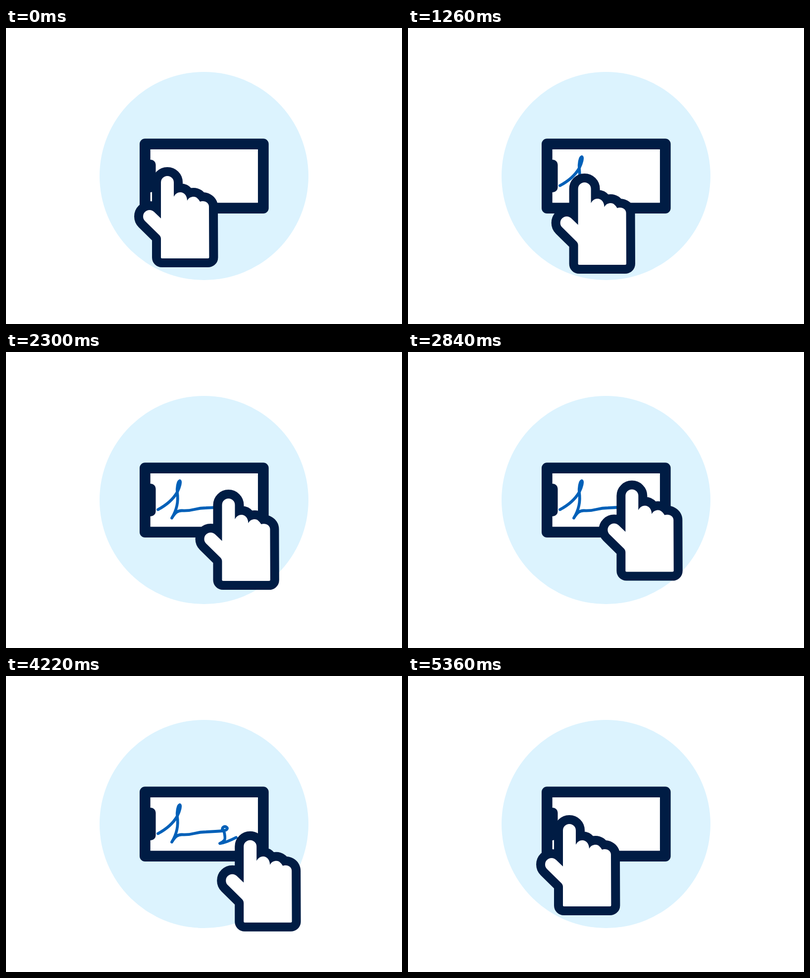
These frames come from a looping animation (800 px wide and 600 px high, 6020 ms). An HTML page:

```html
<!DOCTYPE html>
<html lang="en">
<head>
<meta charset="utf-8">
<title>Signing on a phone</title>
<style>
html, body { margin: 0; width: 100%; height: 100%; overflow: hidden; background: #fff; }
svg { display: block; width: 800px; height: 600px; }
#ink { fill: none; stroke: #0060b8; stroke-width: 5.8; stroke-linecap: round; stroke-linejoin: round; }
#hand { fill: #fff; stroke: #001c44; stroke-width: 36; stroke-linejoin: round; paint-order: stroke; }
</style>
</head>
<body>
<svg viewBox="0 0 800 600">
  <circle cx="400" cy="300" r="211" fill="#dcf3fe"/>
  <g id="phone">
    <rect x="280.8" y="235.2" width="239" height="130" fill="#fff" stroke="#001c44" stroke-width="21.7" stroke-linejoin="round"/>
    <rect x="275" y="267" width="27.5" height="66" rx="10" fill="#001c44"/>
    <path id="ink" pathLength="1" d="M307 319.5Q334 305 346 284C351 274 354 262 351 261C347 262 345 277 346 285
      Q350 312 335 336.5C342 325 347 321.5 355 321.5C380 323 380 316 404 316Q425 315 437 314
      C436 306 441 304 445 306C449 309 446 313 440 313Q444 330 441 333Q438 337 432 339.5C455 336 470 322 492 315"/>
  </g>
  <path id="hand" d="M313 313A13 13 0 0 1 339 313V342C342 336 347 333 352 333C360 333 366 340 366 350
    C369 344 374 342 379 342C385 342 389 347 392 352C401 349 410 354 410 362L410.4 465Q410.4 467 408 467
    H315Q313 467 313 465V428Q313 423 310 420L280.8 391.2A13 13 0 0 1 299.2 372.8L313 386Z"/>
</svg>
<script>
const LOOP = 6020, START = 580, STEP = 620, MOVE = 600, STROKES = 7;
const EXIT = 4680, AWAY = 5040, BACK = 5360;

// Hand offsets at the start and middle of each stroke
const route = [
  [0, 0], [39.5, -11], [30, 12], [56, 21], [67, 6], [94, 2], [128, -5], [123, -21],
  [131, -16], [134, 14], [131, 40], [152, 39], [168, 32], [182, 14], [192, 0]
];

const $ = id => document.getElementById(id);
const clamp = v => Math.max(0, Math.min(1, v));
const ease = p => p * p * (3 - 2 * p);

// Number of strokes done, with a short rest after each
function strokesDone(t) {
  const k = Math.max(0, Math.min(STROKES - 1, Math.floor((t - START) / STEP)));
  const begin = START + k * STEP;
  return k + ease(clamp((t - begin) / Math.min(MOVE, EXIT - begin)));
}

// Catmull-Rom curve through the route
function routeAt(u) {
  const i = Math.min(Math.floor(u), route.length - 2), p = u - i;
  const [a, b, c, d] = [-1, 0, 1, 2].map(n => route[Math.max(0, Math.min(route.length - 1, i + n))]);
  return [0, 1].map(n => b[n] + p / 2 * (c[n] - a[n]
    + p * (2 * a[n] - 5 * b[n] + 4 * c[n] - d[n] + p * (3 * (b[n] - c[n]) + d[n] - a[n]))));
}

function draw(t) {
  const done = t < AWAY ? strokesDone(t) : 0;
  let [x, y] = routeAt(done * 2);

  // Sweep off to the right, then come back the same way
  const away = t < AWAY ? (t - EXIT) / 280 : (BACK - t) / 250;
  x += (541 - x) * Math.max(0, away) ** 3.5;
  $('hand').setAttribute('transform', `translate(${x} ${y})`);

  // The first stroke is the longest, later ones get shorter
  const drawn = Math.min(0.375 * done, Math.sqrt(done / STROKES));
  const shown = t < AWAY ? 1 - clamp((t - 4640) / 250) : clamp((t - 5110) / 240);
  $('ink').style.strokeDasharray = `${drawn} 2`;
  $('ink').setAttribute('opacity', drawn ? shown : 0);
  $('phone').setAttribute('opacity', shown);
}

const begin = performance.now();
function tick() {
  draw((performance.now() - begin) % LOOP);
  requestAnimationFrame(tick);
}
tick();
</script>
</body>
</html>
```
